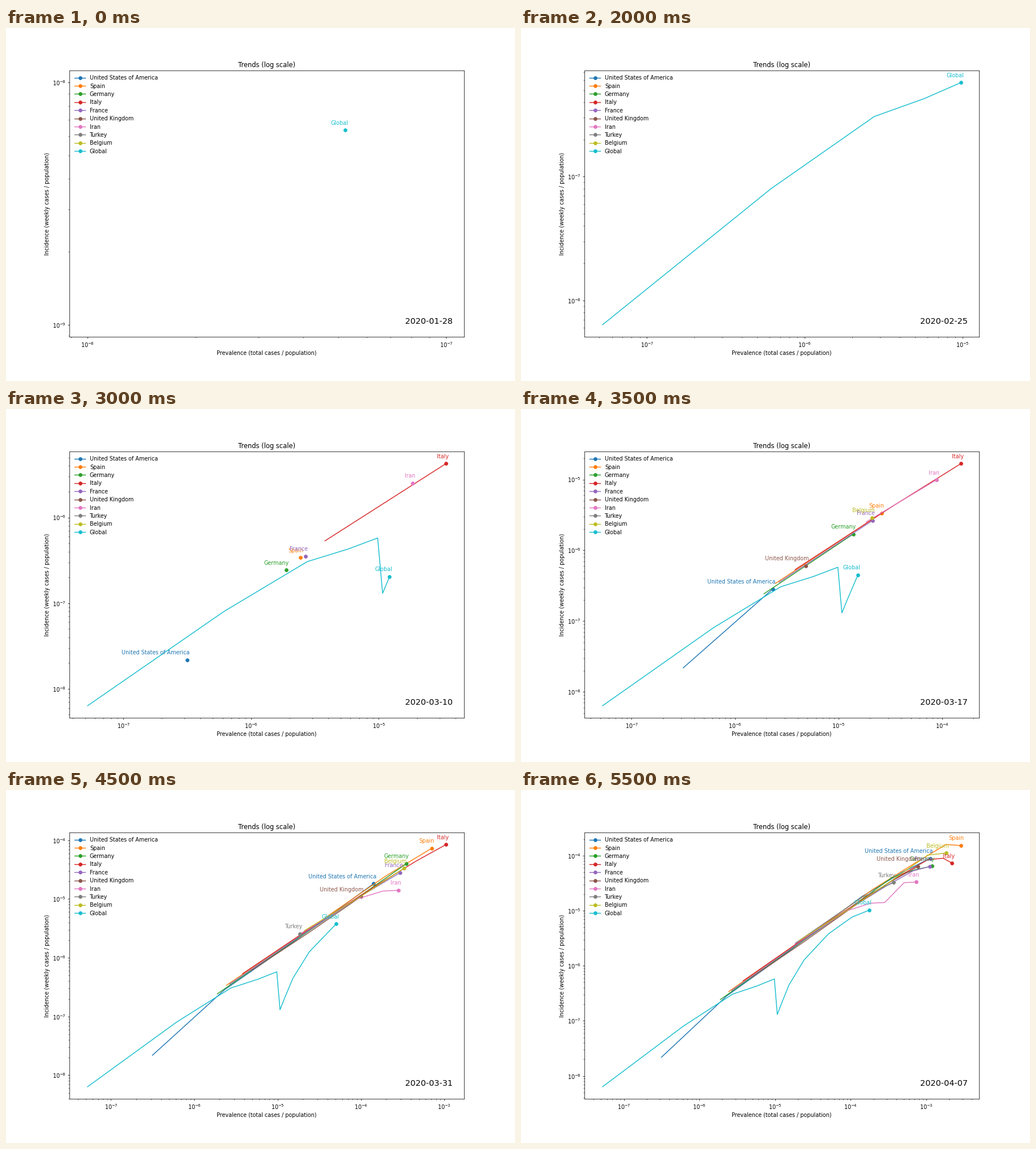
Animation, 899 px wide and 623 px high, one loop 7.5 s. Source, as a matplotlib script:

```python
import matplotlib.pyplot as plt
import numpy as np
from matplotlib.animation import FuncAnimation
from matplotlib.lines import Line2D
from matplotlib.ticker import NullFormatter

W, H = 899, 623
DPI = 72 * 0.9605
START = np.datetime64("2020-01-28")
WEEKS = 12
HOLD = 3

# name, population in millions, cumulative cases per week ending with the
# latest one; the first value only serves as the base of the first difference
DATA = [
    ("United States of America", 327.2, [53, 103, 754, 4661, 46442, 164620, 368196]),
    ("Spain", 46.72, [3, 114, 1204, 9191, 33089, 85195, 135032]),
    ("Germany", 82.9, [16, 157, 1139, 6012, 29212, 61913, 99225]),
    ("Italy", 60.43, [3, 229, 2036, 9172, 27980, 63927, 101739, 132547]),
    ("France", 66.99, [12, 178, 1412, 6633, 19856, 44550, 74390]),
    ("United Kingdom", 66.49, [40, 321, 1543, 6650, 22141, 51608]),
    ("Iran", 81.8, [61, 1501, 7161, 14991, 23049, 41495, 60500]),
    ("Turkey", 82.32, [47, 1529, 11535, 30217]),
    ("Belgium", 11.42, [8, 239, 1085, 3743, 11899, 20814]),
    ("Global", 7487, [59, 392, 4593, 20622, 43101, 73332, 80160, 90890,
                      114300, 180900, 379000, 780200, 1316000]),
]

plt.rcParams.update({"font.family": "DejaVu Sans", "font.size": 10})
fig = plt.figure(figsize=((W + 1e-6) / DPI, (H + 1e-6) / DPI), dpi=DPI,
                 facecolor="white")
ax = fig.add_axes([0.125, 0.125, 0.775, 0.755])
ax.set_xscale("log")
ax.set_yscale("log")
for axis in (ax.xaxis, ax.yaxis):
    axis.set_minor_formatter(NullFormatter())
ax.set_title("Trends (log scale)")
ax.set_xlabel("Prevalence (total cases / population)")
ax.set_ylabel("Incidence (weekly cases / population)")
date = ax.text(0.85, 0.05, "", fontsize=15, transform=ax.transAxes)


def legend_row(i, name, color):
    y = 1 - (87.7 + 14.4 * i) / H
    for xs, style in (([121, 140.2], "-"), ([130.6], "o")):
        fig.add_artist(Line2D(np.array(xs) / W, [y] * len(xs), color=color,
                              linestyle="-" if style == "-" else "none",
                              marker="o" if style == "o" else "",
                              lw=1.5, ms=6))
    fig.text(147.9 / W, y - 3.4 / H, name)


class Trend:
    def __init__(self, i, name, millions, cases):
        color = f"C{i}"
        total = np.array(cases) / (millions * 1e6)
        self.x = total[1:]
        self.y = np.diff(total) / 7
        self.first = WEEKS - len(self.x)
        self.line, = ax.plot([1], [1], "o-", color=color, lw=1.5, ms=6,
                             markevery=[-1])
        self.label = ax.annotate(name, (1, 1), xytext=(5, 10), color=color,
                                 textcoords="offset points", ha="right")
        legend_row(i, name, color)

    def show(self, week):
        n = max(week - self.first + 1, 0)
        self.line.set_visible(n > 0)
        self.label.set_visible(n > 0)
        x, y = self.x[:n], self.y[:n]
        if n:
            self.line.set_data(x, y)
            self.label.xy = x[-1], y[-1]
        return x, y


trends = [Trend(i, *row) for i, row in enumerate(DATA)]


def limits(values):
    v = np.log10(np.concatenate(values))
    lo, hi = v.min(), v.max()
    if lo == hi:
        lo, hi = np.floor(lo), np.ceil(hi)
    pad = 0.05 * (hi - lo)
    return 10 ** (lo - pad), 10 ** (hi + pad)


def update(step):
    week = min(step, WEEKS - 1)
    xs, ys = zip(*(t.show(week) for t in trends))
    ax.set_xlim(limits(xs))
    ax.set_ylim(limits(ys))
    date.set_text(str(START + 7 * min(week, WEEKS - 2)))
    return []


anim = FuncAnimation(fig, update, frames=WEEKS + HOLD, init_func=lambda: update(0),
                     interval=500, repeat=True, repeat_delay=0, blit=False)
plt.show()
```
